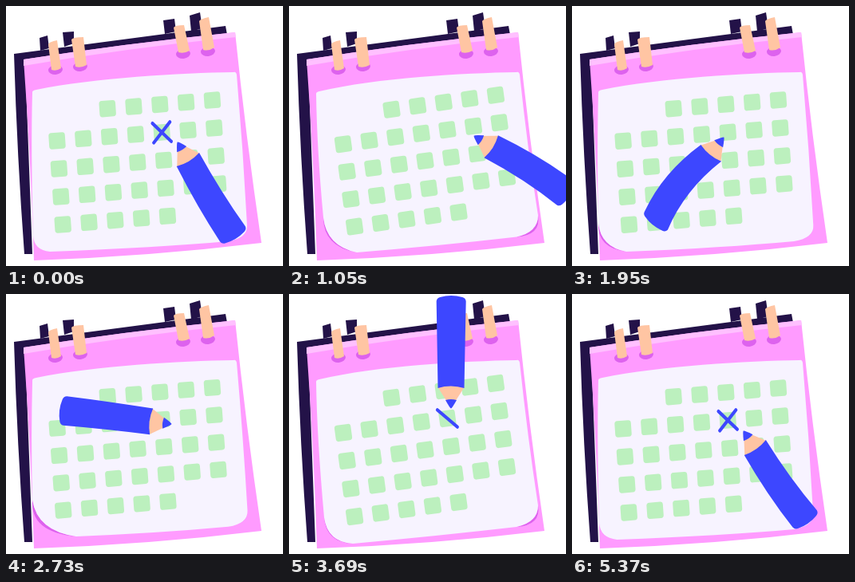
These frames come from a looping animation (347x326 px, 5400 ms). An HTML page with a canvas:

```html
<!DOCTYPE html>
<html lang="en">
<head>
<meta charset="utf-8">
<title>Calendar</title>
<style>
  html, body { margin: 0; width: 100%; height: 100%; overflow: hidden; background: #fff; }
  canvas { display: block; }
</style>
</head>
<body>
<canvas id="stage" width="347" height="326"></canvas>
<script>
const ctx = document.getElementById('stage').getContext('2d');
const LOOP = 5400;
const INK = '#231248', PINK = '#ff9bff', PALE = '#ffc0ff', PURPLE = '#dd62ee';
const PEACH = '#ffc5a3', BLUE = '#3d47ff', GREEN = '#bcf0be', PAPER = '#f7f3ff';

// time, swing, lift, curl, left end x y, corner x y, bottom start x y
const SHEET = [
  [0, 0, 0, 0, 34, 288, 35, 306, 55, 308],
  [1050, 1, .8, 4, 43, 265, 47, 301, 85, 309],
  [1950, .03, 0, 5, 33, 272, 36, 302, 68, 308],
  [2730, .05, 1, 9, 33, 258, 39, 297, 88, 304],
  [3420, .85, -.2, 2, 42, 282, 46, 312, 74, 315],
  [3690, 1, 0, 2, 44, 280, 48, 311, 80, 313],
  [4440, .2, 1, 11, 36, 255, 42, 297, 98, 304],
  [5400, 0, 0, 0, 34, 288, 35, 306, 55, 308]
];

// time, tip x, tip y, angle, bend
const PENCIL = [
  [0, 215, 171, 59, 3],
  [350, 213, 171, 66, 0],
  [700, 222, 168, 50, -4],
  [1050, 232, 163, 32, -5],
  [1250, 230, 163, 37, 2],
  [1650, 205, 167, 94, 12],
  [1950, 190, 165, 129, 14],
  [2730, 207, 163, 187, 1],
  [3030, 186, 147, 208, 2],
  [3350, 211, 166, 240, 2],
  [3690, 203, 143, 270, 0],
  [4440, 185, 168, 337, 2],
  [4850, 207, 147, 358, 3],
  [5150, 214, 164, 396, 5],
  [5370, 215, 172, 415, 4],
  [5400, 215, 171, 419, 3]
];

// Smooth interpolation that never overshoots its keys
function sample(keys, t) {
  let i = 0;
  while (i < keys.length - 2 && t >= keys[i + 1][0]) i++;
  const a = keys[i], b = keys[i + 1], span = b[0] - a[0], p = (t - a[0]) / span;
  const slope = (k, j) => (keys[k + 1][j] - keys[k][j]) / (keys[k + 1][0] - keys[k][0]);
  const tangent = (k, j) => {
    const s = slope(Math.max(k - 1, 0), j);
    const e = slope(Math.min(k, keys.length - 2), j);
    return s * e <= 0 ? 0 : 2 * s * e / (s + e);
  };
  const q = 1 - p;
  return a.slice(1).map((v, n) => {
    const j = n + 1;
    return v * q * q * (1 + 2 * p) + b[j] * p * p * (3 - 2 * p)
      + span * p * q * (tangent(i, j) * q - tangent(i + 1, j) * p);
  });
}

const ramp = (t, from, to) => Math.min(1, Math.max(0, (t - from) / (to - from)));

function fill(path, color) {
  ctx.fillStyle = color;
  ctx.fill(new Path2D(path));
}

function drawBoard() {
  fill('M10 60 L275 25 L277 36 L24 70 L33 311 L23 311 Q14 190 10 60Z', INK);
  fill('M42 40L52 37L54 53L43 56Z M71 33L85 32L85 47L73 51Z'
    + 'M197 18L211 16L213 32L199 35Z M230 12L243 8L246 28L232 32Z', INK);
  fill('M22 67 Q150 47 287 33 Q300 160 320 297 Q180 314 35 319 Q31 190 22 67Z', PINK);
  fill('M22 67 Q150 47 287 33 L288 39 Q150 53 22 75Z', PALE);
  for (const [x, y] of [[62, 80], [93, 76], [222, 60], [253, 57]]) {
    ctx.fillStyle = PURPLE;
    ctx.beginPath();
    ctx.ellipse(x, y, 9, 6, -.1, 0, 7);
    ctx.fill();
  }
  const rings = 'M53 48Q54 45 64 43L69 78Q63 82 57 80Z M82 42Q84 39 97 39L101 74Q94 78 87 76Z'
    + 'M210 27Q212 24 223 24L230 56Q223 60 216 58Z M242 19Q244 16 254 14L261 52Q254 57 247 55Z';
  fill(rings, PEACH);
}

function drawStroke(x, y, part) {
  if (part <= 0) return;
  ctx.beginPath();
  ctx.moveTo(x, y);
  ctx.lineTo(x - 2 * x * part, y - 2 * y * part);
  ctx.stroke();
}

function drawSheet(t) {
  const [u, lift, curl, lx, ly, cx, cy, bx, by] = sample(SHEET, t);
  const rise = 3 * lift;
  const r1 = `${278 + 7 * u} ${295 - 3 * u - rise}`;
  const r2 = `${302 + 10 * u} ${275 - 10 * u - rise}`;
  const rx = 303 + 9 * u, ry = 291 - 5 * u - rise;
  const top = 108 + 2 * u;

  fill(`M${lx} ${ly} Q${cx - curl} ${cy + curl * .2} ${bx} ${by} Q${cx} ${cy} ${lx} ${ly}Z`
    + `M${r1} Q${rx + 4 * u} ${ry + 4 * u} ${r2} Q${rx} ${ry} ${r1}Z`, PURPLE);
  fill(`M${33 + u} ${top} Q${33 + u} ${top - 2} 38 ${top - 3} C110 90 220 84 285 83`
    + `Q288 82 289 86 Q${297 + 2 * u} 180 ${r2} Q${rx} ${ry} ${r1}`
    + `Q190 ${303 - rise} ${bx} ${by} Q${cx} ${cy} ${lx} ${ly} Q${31 + 4 * u} 180 ${33 + u} ${top}Z`, PAPER);

  // Grid basis follows the swinging paper
  const col = [32.8 - .2 * u, -2.65 - 1.85 * u];
  const row = [2.4 + 2.3 * u, 35 - .7 * lift];
  const place = (c, r) => ctx.setTransform(
    col[0] / 33, col[1] / 33, row[0] / 33, row[1] / 33,
    64 + 4 * u + c * col[0] + r * row[0],
    169 + 5 * u - lift + c * col[1] + r * row[1]);

  ctx.fillStyle = GREEN;
  for (let i = 2; i < 33; i++) {
    place(i % 7, Math.floor(i / 7) - 1);
    ctx.beginPath();
    ctx.roundRect(-10.3, -9.6, 20.6, 19.2, 3.5);
    ctx.fill();
  }

  place(4, 0);
  const size = t < 2000 ? 1 - ramp(t, 480, 640) : 1;
  if (size > 0) {
    ctx.scale(size, size);
    ctx.strokeStyle = BLUE;
    ctx.lineWidth = 4;
    ctx.lineCap = 'round';
    drawStroke(-11, -11.5, t < 2000 ? 1 : ramp(t, 3030, 3350));
    drawStroke(-11, 11.5, t < 2000 ? 1 : ramp(t, 4440, 4850));
  }
  ctx.resetTransform();
}

function drawPencil(t) {
  const [x, y, angle, bend] = sample(PENCIL, t);
  ctx.translate(x, y);
  ctx.rotate(angle * Math.PI / 180);
  fill('M0 0 L26 -16.5 L30 0 L26 16.5Z', PEACH);
  fill('M-.5 0 Q0 -1.5 10 -7 Q12 0 10 7 Q0 1.5 -.5 0Z', BLUE);
  fill(`M25 -16.5 Q82 ${bend - 17.5} 134 -18.5 Q138 -18 139 -14 Q143 0 139 14`
    + `Q138 18 134 18.5 Q82 ${bend + 17.5} 25 16.5 Q30 0 25 -16.5Z`, BLUE);
  ctx.resetTransform();
}

function frame() {
  const t = performance.now() % LOOP;
  ctx.fillStyle = '#fff';
  ctx.fillRect(0, 0, 347, 326);
  drawBoard();
  drawSheet(t);
  drawPencil(t);
  requestAnimationFrame(frame);
}
frame();
</script>
</body>
</html>
```
